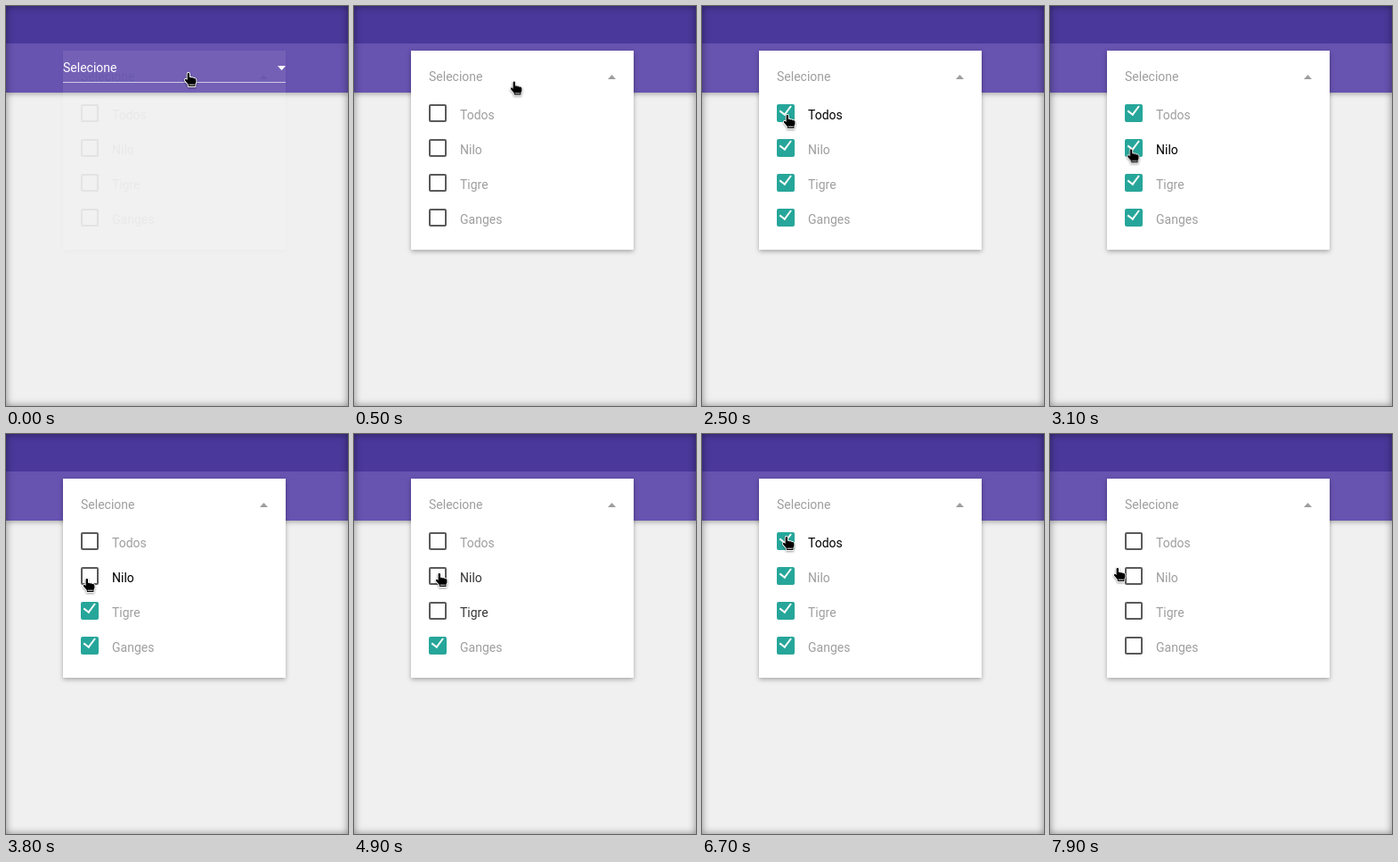
These frames come from a looping animation (384 by 448 pixels, 8 s). An HTML page:

```html
<!DOCTYPE html>
<html lang="pt">
<head>
<meta charset="utf-8">
<title>Multiple select</title>
<style>
@property --on { syntax: "<number>"; inherits: true; initial-value: 0; }
@property --hot { syntax: "<number>"; inherits: true; initial-value: 0; }

html, body { margin: 0; width: 100%; height: 100%; overflow: hidden; }
.stage {
  position: relative; width: 384px; height: 448px; overflow: hidden;
  background: #f0f0f0; font: 14px/20px Roboto, sans-serif;
}
.stage *, .stage::after { position: absolute; box-sizing: border-box; }
.stage::after {
  content: ""; inset: 0;
  box-shadow: inset 0 0 8px rgba(0, 0, 0, .45);
}
.bar {
  left: 0; top: 0; width: 384px; height: 97px;
  background: linear-gradient(#4a389a 42px, #6753b0 42px);
  box-shadow: 0 2px 5px rgba(0, 0, 0, .28);
}
.field {
  left: 64px; top: 50px; width: 250px; height: 36px;
  color: #fff; border-bottom: 1px solid rgba(255, 255, 255, .65);
}
.field span { left: 0; top: 9px; }
.arrow { width: 9px; height: 5px; background: currentColor; }
.down { left: 241px; top: 17px; clip-path: polygon(0 0, 100% 0, 50% 100%); }
.up { left: 221px; top: 27px; clip-path: polygon(0 100%, 100% 100%, 50% 0); }

.panel {
  left: 64px; top: 50px; width: 250px; height: 223px;
  background: #fff; color: #9e9e9e;
  box-shadow: 0 2px 5px rgba(0, 0, 0, .3);
  animation: open 8s linear infinite;
}
.title { left: 20px; top: 19px; }
.row { left: 20px; height: 20px; width: 210px; }
.row span {
  left: 35px; top: 2px;
  color: color-mix(in srgb, #000 calc(var(--hot) * 100%), #9e9e9e);
}
.box {
  --fill: clamp(0, var(--on) * 1.2, 1);
  --grow: clamp(0, var(--on) * 1.5 - .5, 1);
  left: 0; top: 0; width: 20px; height: 20px; border-radius: 2px;
  border: 2px solid color-mix(in srgb, #26a69a calc(var(--fill) * 100%), #5a5a5a);
  background: rgb(38 166 154 / var(--fill));
}
.box::after {
  content: ""; position: absolute; box-sizing: border-box;
  left: calc(4px - 5px * var(--grow)); top: calc(8px - 10px * var(--grow));
  width: calc(8px * var(--grow)); height: calc(13px * var(--grow));
  border: solid rgb(255 255 255 / var(--grow)); border-width: 0 2px 2px 0;
  transform: rotate(37deg); transform-origin: 100% 100%;
}

.todos { top: 60px; animation: check-pair 8s linear infinite, hot-todos 8s linear infinite; }
.nilo { top: 99px; animation: check-pair 8s linear infinite, hot-nilo 8s linear infinite; }
.tigre { top: 138px; animation: check-tigre 8s linear infinite, hot-tigre 8s linear infinite; }
.ganges { top: 177px; animation: check-ganges 8s linear infinite; }

.hand {
  left: 0; top: 0; width: 15px; height: 17px; overflow: visible;
  filter: drop-shadow(0 1px 1px rgba(0, 0, 0, .4));
  animation: move 8s ease-in-out infinite;
}

@keyframes open {
  0% { opacity: .08; }
  1.25% { opacity: .38; }
  2.5% { opacity: .72; }
  3.75% { opacity: .94; }
  5%, 100% { opacity: 1; }
}
@keyframes check-pair {
  0%, 20% { --on: 0; }
  23.75%, 43.75% { --on: 1; }
  47.5%, 77.5% { --on: 0; }
  81.25%, 87.5% { --on: 1; }
  91.25%, 100% { --on: 0; }
}
@keyframes check-tigre {
  0%, 20% { --on: 0; }
  23.75%, 57.5% { --on: 1; }
  61.25%, 77.5% { --on: 0; }
  81.25%, 87.5% { --on: 1; }
  91.25%, 100% { --on: 0; }
}
@keyframes check-ganges {
  0%, 20% { --on: 0; }
  23.75%, 87.5% { --on: 1; }
  91.25%, 100% { --on: 0; }
}
@keyframes hot-todos {
  0%, 11.25% { --hot: 0; }
  15%, 35% { --hot: 1; }
  38.75%, 70% { --hot: 0; }
  73.75%, 93.75% { --hot: 1; }
  97.5%, 100% { --hot: 0; }
}
@keyframes hot-nilo {
  0%, 35% { --hot: 0; }
  38.75%, 51.25% { --hot: 1; }
  55%, 58.75% { --hot: 0; }
  62.5%, 70% { --hot: 1; }
  73.75%, 100% { --hot: 0; }
}
@keyframes hot-tigre {
  0%, 51.25% { --hot: 0; }
  55%, 60% { --hot: 1; }
  63.75%, 100% { --hot: 0; }
}
@keyframes move {
  0%, 3.75% { transform: translate(200px, 74px); }
  11.25% { transform: translate(93px, 115px); }
  16.25%, 31.25% { transform: translate(91px, 121px); }
  40%, 50% { transform: translate(86px, 161px); }
  53.75%, 57.5% { transform: translate(88px, 191px); }
  61.25%, 65% { transform: translate(91px, 155px); }
  75%, 92.5% { transform: translate(90px, 114px); }
  96.25% { transform: translate(59px, 152px); }
  98.75%, 100% { transform: translate(71px, 149px); }
}
</style>
</head>
<body>
<div class="stage">
  <div class="bar"></div>
  <div class="field"><span>Selecione</span><i class="arrow down"></i></div>
  <div class="panel">
    <span class="title">Selecione</span><i class="arrow up"></i>
    <div class="row todos"><i class="box"></i><span>Todos</span></div>
    <div class="row nilo"><i class="box"></i><span>Nilo</span></div>
    <div class="row tigre"><i class="box"></i><span>Tigre</span></div>
    <div class="row ganges"><i class="box"></i><span>Ganges</span></div>
  </div>
  <svg class="hand" viewBox="0 0 15 17">
    <path d="M3.6 2.2C3.6.6 6 .6 6 2.2V6C6.4 5.4 8.2 5.5 8.4 6.6 9 6 10.6 6.2 10.8 7.2 11.6 6.7 13.4 7.2 13.4 8.8V11.5L12.4 13.6V16H4.8V14L1.2 9.8C.2 8.4 1.8 7.2 2.8 8.2L3.6 9Z"
      stroke="#fff" stroke-width="1.8" stroke-linejoin="round" paint-order="stroke"/>
    <path d="M5.6 14.2h6" stroke="#fff" stroke-width=".9"/>
  </svg>
</div>
</body>
</html>
```
